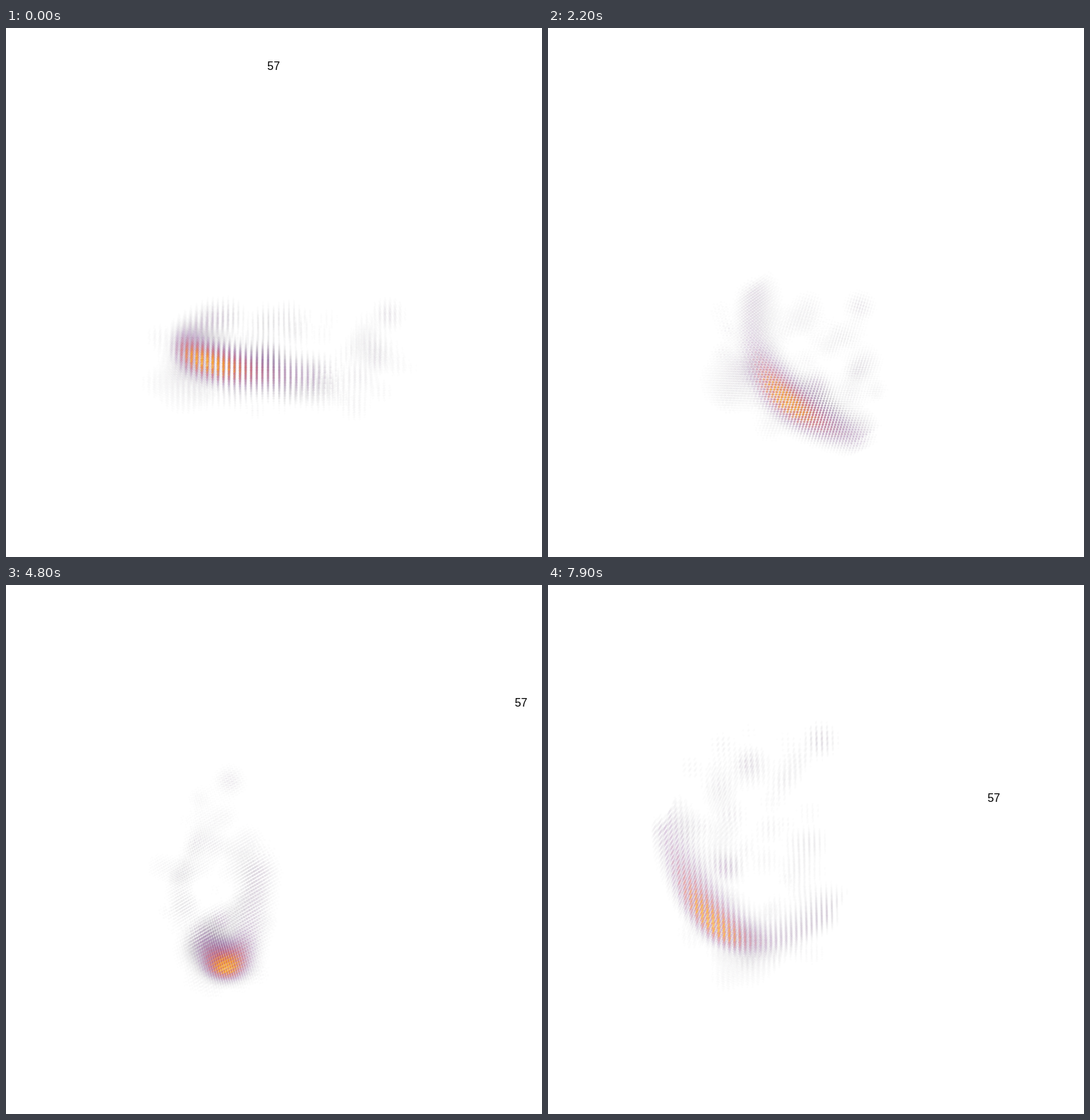
Animation of 753 by 744 pixels, one loop 8000 ms. Source, as an HTML page with a canvas:

```html
<!DOCTYPE html>
<html lang="en">
<head>
<meta charset="utf-8">
<title>Rotating voxel cloud</title>
<style>
html, body { margin: 0; width: 100%; height: 100%; overflow: hidden; background: #fff; }
canvas { display: block; }
</style>
</head>
<body>
<canvas id="stage" width="753" height="744"></canvas>
<script>
const ctx = document.getElementById('stage').getContext('2d');
const CX = 376, CY = 372, STEP = 7.2, CAMERA = 1700, RADIUS = 1.6;
const TILT = Math.PI / 10, SIN = Math.sin(TILT), COS = Math.cos(TILT);
const LABEL = { x: 0, y: 280, z: 280 };

let seed = 11;
const random = (lo, hi) => {
  seed = seed * 16807 % 2147483647;
  return lo + (hi - lo) * seed / 2147483647;
};

// The body is an ellipsoid; faint spots lie scattered through its outer half.
const BODY = { x: 5, y: -88, z: -68, rx: 212, ry: 120, rz: 72 };
const spots = [
  { x: -10, y: -122, z: -48, size: 13, value: .27 },
  { x: 163, y: 12, z: -38, size: 14, value: .16 },
  { x: 128, y: -83, z: -47, size: 18, value: .09 },
  { x: 20, y: -4, z: -34, size: 15, value: .1 },
  { x: -120, y: -95, z: -98, size: 26, value: .1 }
];
for (let i = 0; i < 75; i++) {
  const turn = random(0, 2 * Math.PI), h = random(-1, 1), r = random(.5, .93);
  const ring = r * Math.sqrt(1 - h * h);
  spots.push({
    x: BODY.x + BODY.rx * ring * Math.cos(turn),
    y: BODY.y + BODY.ry * ring * Math.sin(turn),
    z: BODY.z + BODY.rz * r * h,
    size: random(8, 15), value: random(.03, .085)
  });
}

function spotValue(x, y, z) {
  let sum = 0;
  for (const s of spots) {
    const d = ((x - s.x) ** 2 + (y - s.y) ** 2 + (z - s.z) ** 2) / (2 * s.size ** 2);
    if (d < 5) sum += s.value * Math.exp(-d);
  }
  return sum;
}

// The bright ridge follows a hooked curve, brightest before its bend.
const bezier = (t, a, b, c) => (1 - t) ** 2 * a + 2 * t * (1 - t) * b + t * t * c;
const fromCentre = (x, y) => Math.hypot(x - 20, y + 60);
const ridge = Array.from({ length: 31 }, (_, i) => {
  const t = i / 30, x = bezier(t, 45, -205, -85), y = bezier(t, -203, -150, 12);
  return { x, y, reach: fromCentre(x, y), value: .2 + .66 * Math.exp(-(((t - .37) / .25) ** 2)) };
});

// Steep towards the outside, soft towards the inside.
function ridgeValue(x, y, z) {
  const depth = ((z + 42 - .04 * y) / 16) ** 2 / 2, reach = fromCentre(x, y);
  let best = 0;
  for (const p of ridge) {
    const width = reach > p.reach ? 11 : 25;
    const d = ((x - p.x) ** 2 + (y - p.y) ** 2) / (2 * width * width) + depth;
    if (d < 5) best = Math.max(best, p.value * Math.exp(-d));
  }
  return best;
}

const RAMP = [[0, 0, 4], [87, 16, 110], [188, 55, 84], [249, 142, 9], [252, 255, 164]];
function colour(v) {
  const p = Math.min(v, .9) * 4, i = Math.floor(p), f = p - i;
  const rgb = RAMP[i].map((c, k) => Math.round(c + (RAMP[i + 1][k] - c) * f));
  return `rgba(${rgb},${Math.min(.8, .9 * v ** 1.3).toFixed(3)})`;
}

const points = [];
for (let i = -31; i <= 31; i++)
  for (let j = -30; j <= 6; j++)
    for (let k = -21; k <= 1; k++) {
      const x = i * STEP, y = j * STEP, z = k * STEP;
      const v = Math.max(ridgeValue(x, y, z), spotValue(x, y, z));
      if (v > .025) points.push({ x, y, z, v, fill: colour(v) });
    }
points.sort((a, b) => a.v - b.v);

// Turn about the diagonal (1, 1, 1), 30 degrees a second, then project.
function view(t) {
  const angle = t * Math.PI / 6, c = Math.cos(angle), s = Math.sin(angle) / Math.sqrt(3);
  const a = (1 + 2 * c) / 3, b = (1 - c) / 3 + s, d = (1 - c) / 3 - s;
  return p => {
    const x = a * p.x + d * p.y + b * p.z;
    const y = b * p.x + a * p.y + d * p.z;
    const z = d * p.x + b * p.y + a * p.z;
    const scale = 1 / (1 - (SIN * z - COS * y) / CAMERA);
    return [CX + x * scale, CY - (SIN * y + COS * z) * scale, scale];
  };
}

function draw(t) {
  const project = view(t);
  ctx.fillStyle = '#fff';
  ctx.fillRect(0, 0, 753, 744);
  for (const p of points) {
    const [x, y, scale] = project(p);
    ctx.fillStyle = p.fill;
    ctx.beginPath();
    ctx.arc(x, y, RADIUS * scale, 0, 2 * Math.PI);
    ctx.fill();
  }
  const [x, y] = project(LABEL);
  ctx.fillStyle = '#000';
  ctx.font = '16px "Liberation Sans", Arial, sans-serif';
  ctx.textAlign = 'center';
  ctx.fillText('57', x, y + 5.7);
}

let shown = -1;
function tick() {
  const step = Math.floor(performance.now() % 8000 / 100);
  if (step !== shown) draw((shown = step) / 10);
  requestAnimationFrame(tick);
}
tick();
</script>
</body>
</html>
```
